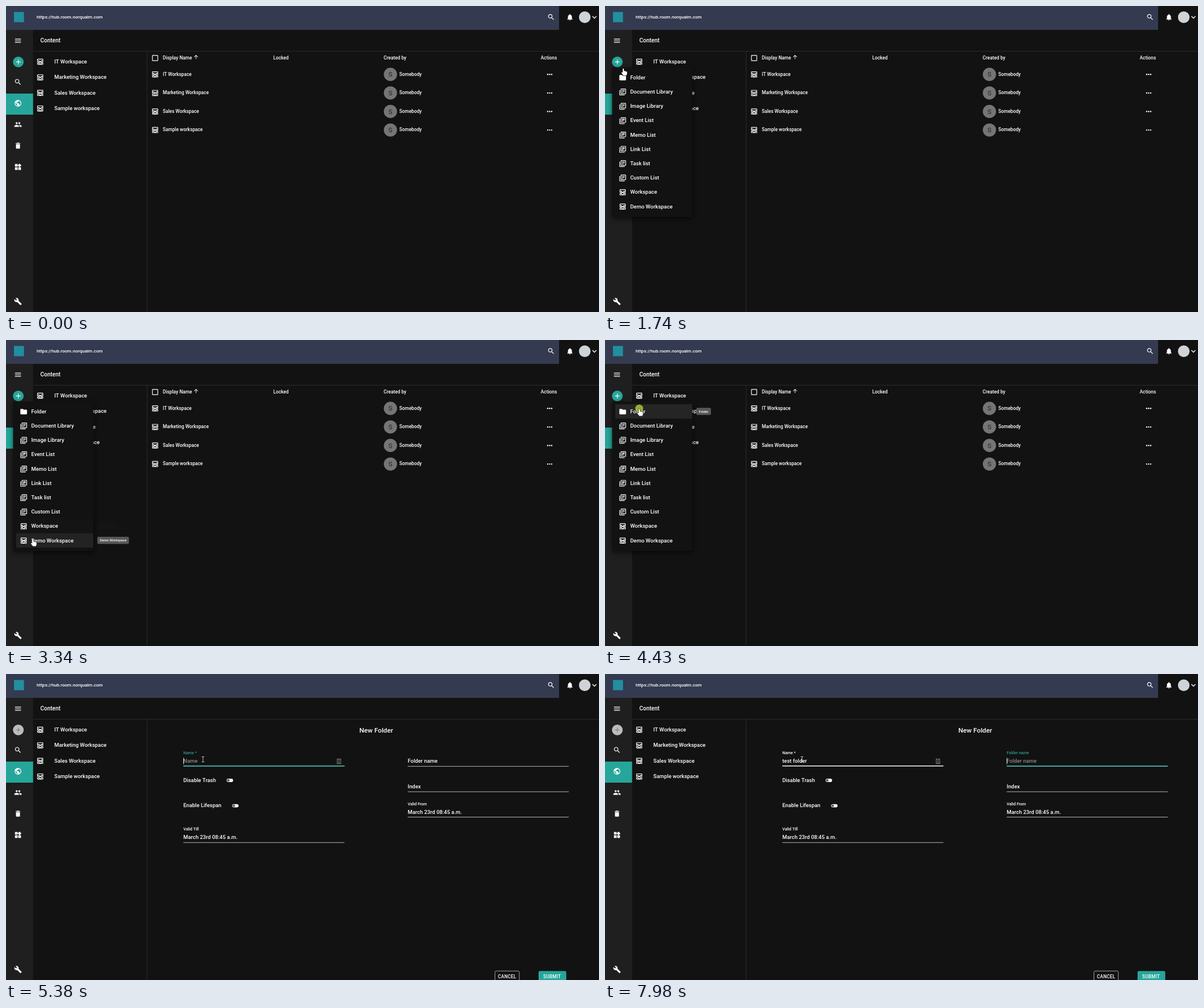
Recreate the animation shown at these times as an HTML page with a canvas. Size 1040 by 538 pixels, loop 8000 ms.

```html
<!DOCTYPE html>
<html lang="en">
<head>
<meta charset="utf-8">
<title>Content admin</title>
<style>
html, body { margin: 0; width: 100%; height: 100%; overflow: hidden; background: #121212; }
canvas { display: block; width: 1040px; height: 538px; }
</style>
</head>
<body>
<canvas id="stage" width="1040" height="538"></canvas>
<script>
const ctx = document.getElementById('stage').getContext('2d');
const LOOP = 8000;
const TEAL = '#26a69a', BG = '#121212', WHITE = '#fff';

// 24-unit icons
const icons = {
  menu: 'M3 18h18v-2H3zM3 13h18v-2H3zM3 6v2h18V6z',
  add: 'M19 13h-6v6h-2v-6H5v-2h6V5h2v6h6z',
  search: 'M15.5 14h-.8l-.3-.3C15.4 12.6 16 11.1 16 9.5 16 5.9 13.1 3 9.5 3S3 5.9 3 9.5 5.9 16 9.5 16c1.6 0 3.1-.6 4.2-1.6l.3.3v.8l5 5 1.5-1.5zM9.5 14C7 14 5 12 5 9.5S7 5 9.5 5 14 7 14 9.5 12 14 9.5 14z',
  globe: 'M12 2C6.5 2 2 6.5 2 12s4.500 10 10 10 10-4.500 10-10S17.500 2 12 2zM11 19.900c-4-.5-7-3.900-7-7.900 0-.6.1-1.200.2-1.800L9 15v1c0 1.100.9 2 2 2zM17.900 17.400c-.3-.8-1-1.400-1.900-1.400h-1v-3c0-.55-.45-1-1-1H8v-2h2c.55 0 1-.45 1-1V7h2c1.100 0 2-.9 2-2v-.4c2.900 1.200 5 4.100 5 7.400 0 2.100-.8 4-2.100 5.400z',
  people: 'M5 8a3 3 0 1 0 6 0a3 3 0 1 0-6 0zM13 8a3 3 0 1 0 6 0a3 3 0 1 0-6 0zM8 13c-2.300 0-7 1.200-7 3.500V19h14v-2.500C15 14.200 10.300 13 8 13zM16 13l-1 .05c1.200.85 2 2 2 3.450V19h6v-2.500C23 14.200 18.300 13 16 13z',
  trash: 'M6 19c0 1.100.9 2 2 2h8c1.100 0 2-.9 2-2V7H6zM19 4h-3.500l-1-1h-5l-1 1H5v2h14z',
  widgets: 'M13 13v8h8v-8zM3 21h8v-8H3zM3 3v8h8V3zM16.700 1.700L11 7.300l5.700 5.700 5.700-5.700z',
  wrench: 'M22.700 19l-9.100-9.100c.9-2.300.4-5-1.500-6.900-2-2-5-2.400-7.400-1.300L9 6 6 9 1.600 4.700C.4 7.100.9 10.100 2.900 12.100c1.900 1.900 4.600 2.400 6.900 1.500l9.100 9.100c.4.4 1 .4 1.400 0l2.300-2.300c.5-.4.5-1.100.1-1.400z',
  bell: 'M12 22c1.100 0 2-.9 2-2h-4c0 1.100.9 2 2 2zM18 16v-5c0-3.100-1.600-5.600-4.500-6.300V4c0-2-3-2-3 0v.7C7.600 5.400 6 7.900 6 11v5l-2 2v1h16v-1z',
  up: 'M4 12l1.400 1.400L11 7.800V20h2V7.800l5.600 5.600L20 12l-8-8z',
  check: 'M5 3h14a2 2 0 0 1 2 2v14a2 2 0 0 1-2 2H5a2 2 0 0 1-2-2V5a2 2 0 0 1 2-2zM5 5v14h14V5z',
  inbox: 'M19 3H5c-1.100 0-2 .9-2 2v7c0 1.100.9 2 2 2h14c1.100 0 2-.9 2-2V5c0-1.100-.9-2-2-2zM5 10h3.100c.2.8.7 1.500 1.300 2H5zM14.600 12c.6-.5 1.100-1.200 1.300-2H19v2zM19 8h-5v1a2 2 0 0 1-4 0V8H5V5h14zM3 15h7v1a2 2 0 0 0 4 0v-1h7v4c0 1.100-.9 2-2 2H5c-1.100 0-2-.9-2-2zM5 17h3.100c.2.8.7 1.500 1.300 2H5zM14.600 19c.6-.5 1.100-1.200 1.300-2H19v2z',
  folder: 'M10 4H4a2 2 0 0 0-2 2v12a2 2 0 0 0 2 2h16a2 2 0 0 0 2-2V8a2 2 0 0 0-2-2h-8z',
  library: 'M4 6H2v14a2 2 0 0 0 2 2h14v-2H4zM20 2H8a2 2 0 0 0-2 2v12a2 2 0 0 0 2 2h12a2 2 0 0 0 2-2V4a2 2 0 0 0-2-2zM20 16H8V4h12zM10 9h8v2h-8zM10 12h4v2h-4zM10 6h8v2h-8z'
};
for (const k in icons) icons[k] = new Path2D(icons[k]);

const handPath = new Path2D('M2.700 7.400V1.300c0-1.400 2-1.400 2 0V4.700c.5-.6 1.700-.5 1.900.3.6-.4 1.700-.2 1.900.6.8-.3 1.800.1 1.800 1.200v2.600c0 1.200-.9 2-1.100 3.100H3.800C3.200 11.200 1.300 9.400.5 7.900c-.5-1 .7-1.600 1.400-.9z');
const arrowPath = new Path2D('M0 0V11l2.600-2.400 1.700 3.900 1.600-.7-1.700-3.800H7.800z');

const workspaces = ['IT Workspace', 'Marketing Workspace', 'Sales Workspace', 'Sample workspace'];
const menuItems = ['Folder', 'Document Library', 'Image Library', 'Event List', 'Memo List',
  'Link List', 'Task list', 'Custom List', 'Workspace', 'Demo Workspace'];
const ROW_TOP = 113, ROW_H = 25.2;

// Pointer path: time, x, y, kind of easing into the point
const path = [
  [220, 960, 507], [940, 18, 102, 'out'], [1500, 18, 102], [2120, 60, 125], [2220, 61, 122],
  [2450, 57, 197, 'lin'], [2970, 51, 317, 'out'], [3060, 51, 317], [3340, 47, 350, 'out'],
  [3400, 47, 350], [3840, 60, 121], [4480, 60, 121], [4880, 344, 150], [5200, 344, 150], [5300, 345, 150]
];
const ease = {
  lin: u => u,
  out: u => 1 - (1 - u) ** 2,
  both: u => u * u * (3 - 2 * u)
};
const clicks = [1400, 4430, 5160];

// Menu tooltips: row, shown from, hidden from
const tips = [[0, 2020, 2230], [2, 2480, 2570], [8, 3040, 3240], [9, 3230, 3480], [0, 3800, 4440]];

// Typing: time, number of letters
const NAME = 'test folder';
const keys = [[5940, 2], [6100, 3], [6200, 4], [6790, 5], [6950, 6], [7200, 7], [7350, 8], [7440, 10], [7600, 11]];
const FOCUS_NAME = 5160, FOCUS_FOLDER = 7800, SWITCH = 4560;

const ramp = (t, a, b) => Math.min(1, Math.max(0, (t - a) / (b - a)));
const smooth = (t, a, b) => ease.both(ramp(t, a, b));
const mix = (a, b, u) => a + (b - a) * u;

function text(s, x, y, size = 9.4, color = WHITE, opt = {}) {
  ctx.font = `${opt.weight || 500} ${size}px Roboto, sans-serif`;
  ctx.textAlign = opt.align || 'left';
  ctx.letterSpacing = (opt.gap || 0) + 'px';
  ctx.fillStyle = color;
  ctx.fillText(s, x, y + size * 0.355);
}
function rect(x, y, w, h, color) {
  ctx.fillStyle = color;
  ctx.fillRect(x, y, w, h);
}
function round(x, y, w, h, r, color) {
  ctx.beginPath();
  ctx.roundRect(x, y, w, h, r);
  ctx.fillStyle = color;
  ctx.fill();
}
function disc(x, y, r, color) {
  ctx.beginPath();
  ctx.arc(x, y, r, 0, 7);
  ctx.fillStyle = color;
  ctx.fill();
}
function icon(name, x, y, size = 14, color = WHITE) {
  ctx.save();
  ctx.translate(x - size / 2, y - size / 2);
  ctx.scale(size / 24, size / 24);
  ctx.fillStyle = color;
  ctx.fill(icons[name], name === 'people' ? 'nonzero' : 'evenodd');
  ctx.restore();
}
function faded(alpha, draw) {
  if (alpha <= 0) return;
  ctx.save();
  ctx.globalAlpha = alpha;
  draw();
  ctx.restore();
}
function tooltip(s, x, y, alpha) {
  faded(alpha, () => {
    ctx.font = '500 5.9px Roboto, sans-serif';
    ctx.letterSpacing = '0px';
    round(x, y - 6.3, ctx.measureText(s).width + 9, 12.6, 2.3, '#585858');
    text(s, x + 4.5, y, 5.9);
  });
}

function pointer(t) {
  if (t < path[0][0]) return null;
  const i = path.findIndex(p => p[0] > t);
  if (i < 0) return path[path.length - 1].slice(1, 3);
  const a = path[i - 1], b = path[i];
  const u = ease[b[3] || 'both'](ramp(t, a[0], b[0]));
  return [mix(a[1], b[1], u), mix(a[2], b[2], u)];
}
function rowAt(t) {
  if (t < 1700 || t > 4480) return -1;
  const [x, y] = pointer(t);
  return x < 18 ? -1 : Math.floor((y - ROW_TOP) / ROW_H);
}
// Hover fades: share of the last moments spent on the row
function hover(row, t) {
  let n = 0;
  for (let k = 0; k < 10; k++) if (rowAt(t - 50 - k * 13) === row) n++;
  return n / 10;
}

function shell(t) {
  rect(0, 0, 1040, 538, BG);
  rect(0, 0, 970, 42, '#343a4f');
  rect(0, 42, 47.5, 496, '#1f1f1f');
  rect(47.5, 79, 993, 1, '#2a2a2a');
  rect(247, 80, 1, 458, '#2a2a2a');
  rect(14, 10.5, 17.5, 18, '#218f9f');
  text('https://hub.room.norqualm.com', 53.7, 19, 8.1);
  icon('search', 956, 19.5);
  icon('bell', 989, 19.7);
  disc(1015, 19.7, 10.2, '#ced3d8');
  ctx.strokeStyle = WHITE;
  ctx.lineWidth = 1.3;
  ctx.beginPath();
  ctx.moveTo(1028.5, 18);
  ctx.lineTo(1032, 21.5);
  ctx.lineTo(1035.5, 18);
  ctx.stroke();
  text('Content', 60.2, 60.2, 10);

  const over = smooth(t, 840, 960) * (1 - smooth(t, 1480, 1640));
  rect(0, 79.500, 47.5, 37.5, `rgba(255,255,255,${0.09 * over})`);
  rect(0, 154, 47.5, 37, TEAL);
  icon('menu', 21, 61);
  const off = t >= SWITCH;
  disc(21.6, 98.4, 9.4, off ? '#bdbdbd' : TEAL);
  icon('add', 21.6, 98.4, 14, off ? '#808080' : WHITE);
  ['search', 'globe', 'people', 'trash', 'widgets'].forEach((n, i) => icon(n, 21, 133.700 + i * 37.3));
  icon('wrench', 21, 519.5);
  workspaces.forEach((s, i) => {
    icon('inbox', 60, 98 + i * 27.4);
    text(s, 84.8, 97.6 + i * 27.45);
  });
  tooltip('Add new', 43.7, 98.4, smooth(t, 920, 1030) * (1 - smooth(t, 1480, 1600)));
}

function table() {
  icon('check', 261.5, 91.5);
  icon('up', 333.3, 89.7, 11);
  [['Display Name', 275], ['Locked', 468.7], ['Created by', 662.3], ['Actions', 937.8]]
    .forEach(([s, x]) => text(s, x, 91.5, 8.3));
  workspaces.forEach((s, i) => {
    const y = 120 + i * 32.6;
    icon('inbox', 261.5, y + 0.3);
    text(s, 275, y - 0.3, 8.25);
    disc(674.2, y + 0.2, 11.6, '#757575');
    text('S', 674.2, y + 0.3, 11.6, '#252525', { align: 'center', weight: 400 });
    text('Somebody', 689.8, y - 0.3, 8.25);
    for (let k = -1; k < 2; k++) disc(953.5 + k * 3.5, y + 0.3, 1.2, WHITE);
  });
}

function field(label, x, y, o = {}) {
  const up = o.up ?? 0, focus = o.focus ?? 0;
  text(label, x, mix(y, y - 14.2, up), mix(9.4, 7, up), o.active ? '#2a9d97' : WHITE);
  if (o.value) text(o.value, x, y);
  else if (o.hint) faded(0.5 * up, () => text(o.hint, x, y));
  if (o.hover) rect(x, y + 7.9, 282.5, 1.5, WHITE);
  else rect(x, y + 8.8, 282.5, 1, '#b5b5b5');
  if (focus > 0) rect(x + 141.25 * (1 - focus), y + 7.9, 282.5 * focus, 1.6, TEAL);
  if (o.caret) {
    ctx.font = '500 9.4px Roboto, sans-serif';
    ctx.letterSpacing = '0px';
    rect(x + ctx.measureText(o.value || '').width, y - 5.5, 0.9, 11, WHITE);
  }
}
function toggle(label, y, x) {
  text(label, 311, y - 0.5);
  round(x - 5.7, y - 2.900, 11.4, 5.8, 2.9, '#f2f2f2');
  disc(x - 2.8, y, 2.2, '#5a5a5a');
}

function form(t) {
  text('New Folder', 649.3, 99, 11.7, WHITE, { align: 'center' });
  let count = 0, last = FOCUS_NAME;
  for (const [at, n] of keys) if (t >= at) { count = n; last = at; }
  const typing = t >= FOCUS_NAME && t < FOCUS_FOLDER;
  const inFolder = t >= FOCUS_FOLDER;
  const nameUp = smooth(t, FOCUS_NAME + 20, FOCUS_NAME + 220);
  const folderUp = smooth(t, FOCUS_FOLDER, FOCUS_FOLDER + 180);
  const blink = from => (t - from) % 1060 < 530;

  field('Name *', 311, 153, {
    up: nameUp, focus: nameUp * (1 - folderUp), active: typing, hover: t > 4860,
    value: NAME.slice(0, count), hint: 'Name', caret: typing && blink(last)
  });
  field('Folder name', 704.5, 153, {
    up: folderUp, focus: folderUp, active: inFolder, hint: 'Folder name',
    caret: inFolder && blink(FOCUS_FOLDER)
  });
  field('Index', 704.5, 197.7);
  const date = 'March 23rd 08:45 a.m.';
  field('Valid From', 704.5, 242.3, { up: 1, value: date });
  field('Valid Till', 311, 287, { up: 1, value: date });
  toggle('Disable Trash', 187, 392.6);
  toggle('Enable Lifespan', 231.6, 402.2);

  faded(nameUp, () => {
    ctx.strokeStyle = '#8d8d8d';
    ctx.lineWidth = 1;
    ctx.strokeRect(581, 149.5, 6, 8);
    for (let k = 0; k < 3; k++) rect(583.2, 151.2 + k * 1.900, 1.6, 1.1, '#a5a5a5');
  });

  ctx.beginPath();
  ctx.roundRect(857.5, 522.2, 42.7, 21, 2.3);
  ctx.strokeStyle = '#b5b5b5';
  ctx.lineWidth = 0.9;
  ctx.stroke();
  text('CANCEL', 862.8, 532.3, 8.15, WHITE, { gap: 0.23 });
  round(934, 522.2, 48.6, 21, 2.3, TEAL);
  text('SUBMIT', 942.3, 532.3, 8.15, WHITE, { gap: 0.23 });
}

function menu(t) {
  const open = smooth(t, 1480, 1720) * (1 - smooth(t, 4470, 4640));
  faded(open, () => {
    const s = t < 3000 ? mix(0.75, 1, open) : 1;
    ctx.translate(12.5, 108);
    ctx.scale(s, s);
    ctx.translate(-12.5, -108);
    ctx.shadowColor = 'rgba(0,0,0,.6)';
    ctx.shadowBlur = 8;
    ctx.shadowOffsetY = 3;
    round(12.5, 108, 140.5, 263, 2.3, BG);
    ctx.shadowColor = 'transparent';
    menuItems.forEach((label, i) => {
      const y = ROW_TOP + ROW_H * (i + 0.5);
      rect(18, y - ROW_H / 2, 135, ROW_H, `rgba(255,255,255,${0.08 * hover(i, t)})`);
      icon(i === 0 ? 'folder' : i < 8 ? 'library' : 'inbox', 31, y + 0.4);
      text(label, 44.2, y - 0.1, 9.45);
    });
  });
  for (const [row, a, b] of tips) {
    const alpha = smooth(t, a, a + 100) * (1 - smooth(t, b, b + 110));
    tooltip(menuItems[row], 160.2, ROW_TOP + ROW_H * (row + 0.5) - 0.1, alpha);
  }
}

function cursor(t) {
  const p = pointer(t);
  if (!p) return;
  const [x, y] = p;
  for (const c of clicks) {
    if (t >= c && t < c + 180) faded(0.85, () => disc(x, y - 0.5, 7, '#a9c431'));
  }
  ctx.save();
  ctx.translate(x, y);
  if (t > 4480 && x > 311) {
    ctx.strokeStyle = '#c8c8c8';
    ctx.lineWidth = 0.9;
    ctx.beginPath();
    ctx.moveTo(-2, -4.5);
    ctx.lineTo(3, -4.5);
    ctx.moveTo(0.5, -4.5);
    ctx.lineTo(0.5, 4.5);
    ctx.moveTo(-2, 4.5);
    ctx.lineTo(3, 4.5);
    ctx.stroke();
  } else {
    const hand = x < 47 || (t > 1400 && t < 4500);
    if (hand) ctx.translate(-3.7, 0);
    const shape = hand ? handPath : arrowPath;
    ctx.strokeStyle = '#111';
    ctx.lineWidth = 1.2;
    ctx.stroke(shape);
    ctx.fillStyle = WHITE;
    ctx.fill(shape);
  }
  ctx.restore();
}

function draw() {
  const t = performance.now() % LOOP;
  shell(t);
  if (t < SWITCH) table();
  else form(t);
  menu(t);
  cursor(t);
  requestAnimationFrame(draw);
}
draw();
</script>
</body>
</html>
```
